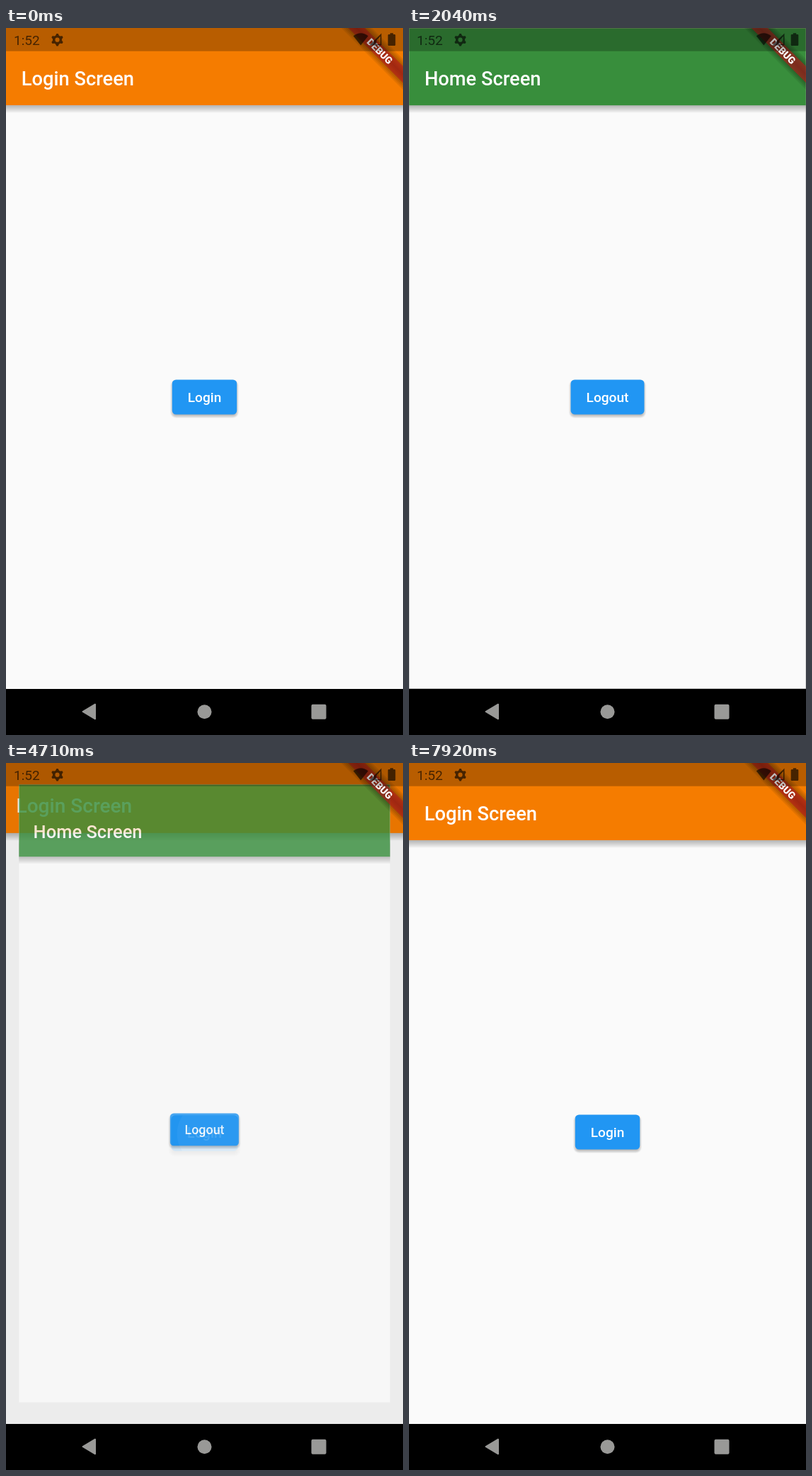
An HTML page with a canvas for the animation above (8 s loop, 561 by 998 pixels).

```html
<!DOCTYPE html>
<html lang="en">
<head>
<meta charset="utf-8">
<title>Login and home</title>
<style>
  html, body { margin: 0; width: 100%; height: 100%; overflow: hidden; background: #000; }
  canvas { display: block; width: 100vw; height: 100vh; }
</style>
</head>
<body>
<canvas id="stage" width="561" height="998"></canvas>
<script>
const W = 561, H = 998, LOOP = 8000;
const DP = W / 411.43;              // pixels per logical unit
const BODY = 933, BAR = 109, STATUS = 32.7;
const HOLD = 100, PUSH = 300;       // press length, page transition length
const TINT = [290, 410];            // status icons change colour
const TAP = { x: 300, y: 523 };

const login = { title: 'Login Screen', color: '#f57c00', label: 'Login', w: 91.5, light: 0 };
const home = { title: 'Home Screen', color: '#388e3c', label: 'Logout', w: 104, light: 1 };
const pushes = [
  { at: 1790, from: login, to: home },
  { at: 3320, from: home, to: login },
  { at: 4643, from: login, to: home },
  { at: 6110, from: home, to: login }
];

const stage = document.getElementById('stage').getContext('2d');
const layer = document.createElement('canvas');
layer.width = W;
layer.height = BODY;
const layerCtx = layer.getContext('2d');

const clamp = v => Math.min(1, Math.max(0, v));
const span = (v, a, b) => clamp((v - a) / (b - a));
const mix = (a, b, k) => a + (b - a) * k;

function bezier(x1, y1, x2, y2) {
  const at = (a, b, s) => 3 * (1 - s) * (1 - s) * s * a + 3 * (1 - s) * s * s * b + s * s * s;
  return x => {
    if (x <= 0) return 0;
    if (x >= 1) return 1;
    let lo = 0, hi = 1;
    for (let i = 0; i < 16; i++) {
      const mid = (lo + hi) / 2;
      if (at(x1, x2, mid) < x) lo = mid; else hi = mid;
    }
    return at(y1, y2, lo);
  };
}
const ease = bezier(0.25, 0.1, 0.25, 1);
const zoomIn = bezier(0.05, 0, 0.1333, 0.06);
const zoomOut = bezier(0.2083, 0.82, 0.25, 1);
const zoom = t => t < 1 / 6 ? 0.4 * zoomIn(t * 6) : 0.4 + 0.6 * zoomOut((t - 1 / 6) * 1.2);

function roundRect(c, x, y, w, h, r) {
  c.beginPath();
  c.roundRect(x, y, w, h, r);
}

// soft-edged rectangle made of a few thin layers
function softRect(c, x, y, w, h, r, soft, alpha) {
  const n = 8;
  c.fillStyle = `rgba(0,0,0,${1 - Math.pow(1 - alpha, 1 / n)})`;
  for (let i = 0; i < n; i++) {
    const d = soft * (1 - 2 * (i + 0.5) / n);
    if (h + 2 * d <= 0) break;
    roundRect(c, x - d, y - d, w + 2 * d, h + 2 * d, Math.max(0, r + d));
    c.fill();
  }
}

function shadow(c, x, y, w, h, r, elevation) {
  softRect(c, x, y + 1.3 * elevation, w, h, r, 1.5 * elevation, 0.29);
}

function text(c, str, x, y, font, align = 'left') {
  c.font = font + ' Roboto, sans-serif';
  c.textAlign = align;
  c.fillText(str, x, y);
}

// press: ms since the finger went down, or null
function drawButton(c, page, press) {
  const { w, label } = page, h = 49, x = (W - w) / 2, y = 496.5;
  const active = press !== null;
  const up = active ? press - HOLD : 0;
  let held = 0;
  if (active) held = up < 0 ? press / 200 : clamp((HOLD - up) / 200);

  shadow(c, x, y, w, h, 5.5, 2 + 6 * held);
  c.fillStyle = '#2196f3';
  roundRect(c, x, y, w, h, 5.5);
  c.fill();

  if (active) {
    c.save();
    c.clip();
    c.fillStyle = `rgba(255,255,255,${0.24 * held})`;
    c.fillRect(x, y, w, h);
    const grow = ease(clamp(up < 0 ? press / 1000 : HOLD / 1000 + up / 225));
    const reach = Math.hypot(w, h) / 2;
    const alpha = 0.24 * clamp(press / 75) * (1 - span(up, 225, 375));
    c.fillStyle = `rgba(255,255,255,${alpha})`;
    c.beginPath();
    c.arc(mix(TAP.x, W / 2, grow), mix(TAP.y, y + h / 2, grow),
      mix(reach * 0.3, reach + 5, grow), 0, 7);
    c.fill();
    c.restore();
  }
  c.fillStyle = '#fff';
  text(c, label, W / 2, 527.6, '500 19.1px', 'center');
}

function drawPage(c, page, scale, press) {
  c.save();
  c.translate(W / 2, BODY / 2);
  c.scale(scale, scale);
  c.translate(-W / 2, -BODY / 2);
  c.beginPath();
  c.rect(0, 0, W, BODY);
  c.clip();
  c.fillStyle = '#fafafa';
  c.fillRect(0, 0, W, BODY);
  shadow(c, -10, 80, W + 20, BAR - 80, 0, 4);
  c.fillStyle = page.color;
  c.fillRect(0, 0, W, BAR);
  c.fillStyle = '#fff';
  text(c, page.title, 21.8, 81.3, '500 27.27px');
  drawButton(c, page, press);
  c.restore();
}

function drawBanner(c) {
  c.save();
  c.translate(W, 0);
  c.rotate(Math.PI / 4);
  c.scale(DP, DP);
  softRect(c, -50, 28, 100, 12, 0, 6, 0.5);
  c.fillStyle = 'rgba(183,28,28,0.627)';
  c.fillRect(-40, 28, 80, 12);
  c.fillStyle = '#fff';
  text(c, 'DEBUG', 0, 37.6, '900 10.2px', 'center');
  c.restore();
}

function drawGear(c, x, y) {
  c.beginPath();
  for (let i = 0; i < 24; i++) {
    const a = (i + 1.5) * Math.PI / 12;
    const r = i % 4 < 2 ? 8.8 : 6.5;
    c.lineTo(x + r * Math.cos(a), y + r * Math.sin(a));
  }
  c.closePath();
  c.moveTo(x + 3.1, y);
  c.arc(x, y, 3.1, 0, 7);
  c.fill('evenodd');
}

function drawStatus(c, light) {
  c.fillStyle = 'rgba(0,0,0,0.25)';
  c.fillRect(0, 0, W, STATUS);
  const g = Math.round(255 * light);
  c.fillStyle = `rgba(${g},${g},${g},${mix(0.62, 1, light)})`;
  text(c, '1:52', 11, 24, '400 19.1px');
  drawGear(c, 72.5, 16.7);

  c.beginPath();                    // wifi
  c.moveTo(501.3, 24.5);
  c.lineTo(490.8, 11.2);
  c.quadraticCurveTo(501.3, 3.4, 511.8, 11.2);
  c.fill();

  c.beginPath();                    // mobile signal, partly full
  c.moveTo(513.5, 24.5);
  c.lineTo(530.5, 7.5);
  c.lineTo(530.5, 24.5);
  c.closePath();
  c.moveTo(523.5, 17.5);
  c.lineTo(523.5, 23);
  c.lineTo(529, 23);
  c.lineTo(529, 11.8);
  c.closePath();
  c.fill('evenodd');

  c.beginPath();                    // battery
  c.roundRect(539.7, 9, 10.6, 16, 1.3);
  c.rect(542.8, 7.3, 4.4, 1.7);
  c.fill();
}

function drawNav(c) {
  c.fillStyle = '#000';
  c.fillRect(0, BODY, W, H - BODY);
  c.fillStyle = c.strokeStyle = '#999997';
  c.lineWidth = 2;
  c.lineJoin = 'round';
  c.beginPath();
  c.moveTo(108.5, 965);
  c.lineTo(126, 954.7);
  c.lineTo(126, 975.3);
  c.closePath();
  c.fill();
  c.stroke();
  c.beginPath();
  c.arc(280.5, 965.2, 10, 0, 7);
  c.fill();
  roundRect(c, 431.5, 954.8, 21, 21, 2);
  c.fill();
}

let still = null;                   // page already shown at rest

function render(now) {
  const c = stage;
  const past = pushes.filter(p => p.at <= now).pop();
  const next = pushes.find(p => p.at > now);
  const page = past ? past.to : login;
  const age = past ? now - past.at : Infinity;
  const down = next ? now - (next.at - HOLD) : -1;
  const press = down >= 0 ? down : null;

  const resting = age > TINT[1] && press === null;
  if (resting && still === page) return;
  still = resting ? page : null;

  if (age < PUSH) {
    const t = age / PUSH, k = zoom(t);
    drawPage(c, past.from, mix(1, 1.05, k), age + HOLD);
    c.fillStyle = `rgba(0,0,0,${0.6 * span(t, 0.2075, 0.4175)})`;
    c.fillRect(0, 0, W, BODY);
    const alpha = span(t, 0.125, 0.25);
    if (alpha === 1) {
      drawPage(c, page, mix(0.85, 1, k), null);
    } else if (alpha > 0) {
      layerCtx.clearRect(0, 0, W, BODY);
      drawPage(layerCtx, page, mix(0.85, 1, k), null);
      c.globalAlpha = alpha;
      c.drawImage(layer, 0, 0);
      c.globalAlpha = 1;
    }
  } else {
    drawPage(c, page, 1, press);
  }

  drawBanner(c);
  drawStatus(c, past ? mix(past.from.light, past.to.light, span(age, ...TINT)) : 0);
  drawNav(c);
}

const start = performance.now();
function tick() {
  render((performance.now() - start) % LOOP);
  requestAnimationFrame(tick);
}
tick();
</script>
</body>
</html>
```
